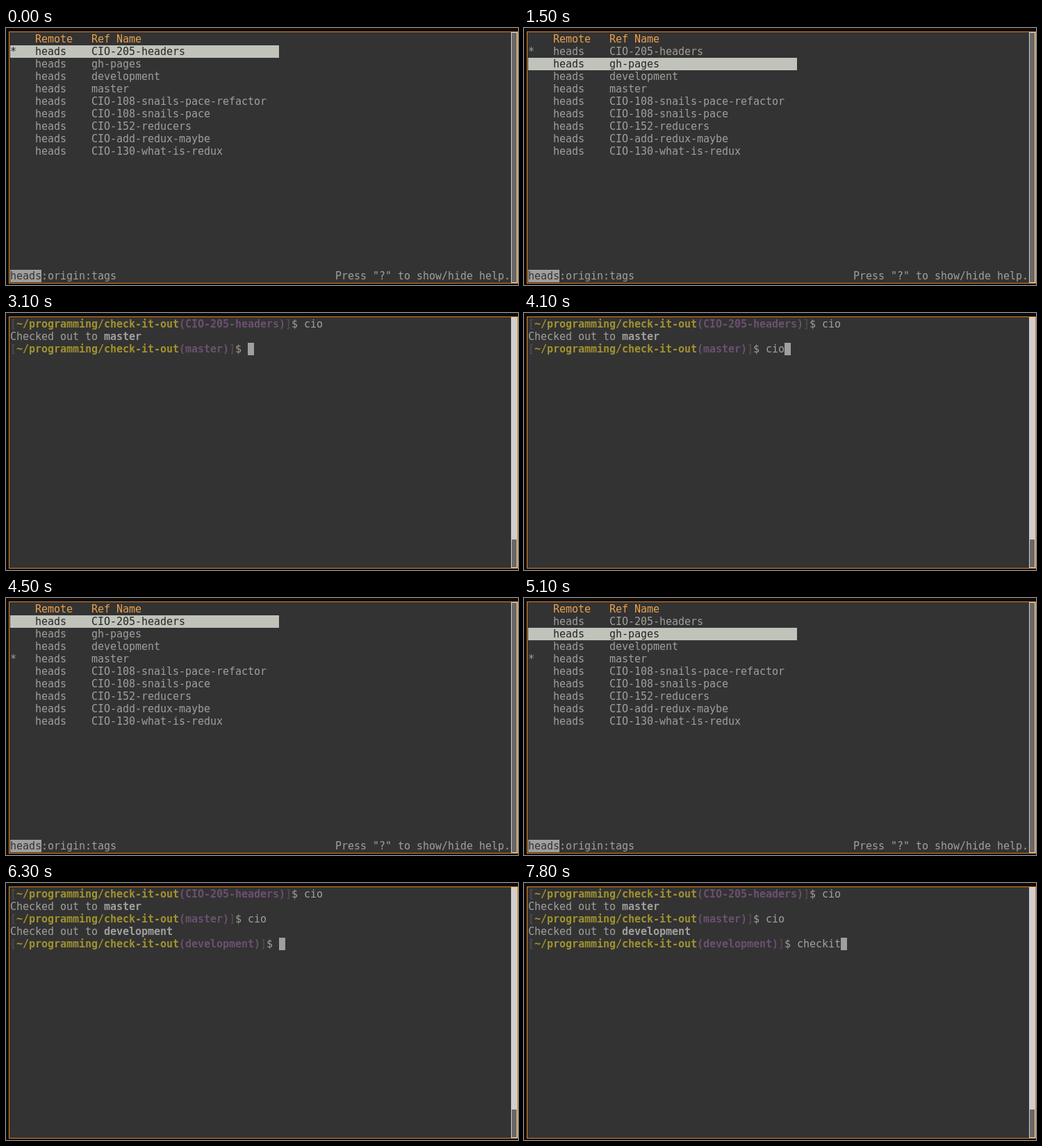
Animation, 737 px wide and 371 px high, one loop 8 s. Source, as an HTML page:

```html
<!DOCTYPE html>
<html lang="en">
<head>
<meta charset="utf-8">
<title>Branch picker in a terminal</title>
<style>
  html, body { margin: 0; width: 100%; height: 100%; overflow: hidden; background: #0c0a0b; }
  svg { display: block; }
  text { font: 15px "DejaVu Sans Mono", monospace; white-space: pre; }
  .bold { font-weight: bold; }
</style>
</head>
<body>
<svg width="737" height="371" viewBox="0 0 737 371" shape-rendering="crispEdges">
  <rect x="4.5" y="5.5" width="732" height="363" fill="#333333" stroke="#e0851f"/>
  <rect x="727" y="6" width="9" height="362" fill="#cfcfcf"/>
  <rect id="thumb" x="728" width="7" fill="#686868"/>
  <g id="screen"></g>
</svg>
<script>
const LOOP = 8000, CELL_W = 9, CELL_H = 18, LEFT = 6, TOP = 7, BASELINE = 14;
const COLOR = {
  text: '#a09f9d', head: '#e8a14f', dark: '#262626', select: '#c0c3ba',
  path: '#a0922e', branch: '#6b5070', bracket: '#58524f'
};
const BRANCHES = [
  'CIO-205-headers', 'gh-pages', 'development', 'master',
  'CIO-108-snails-pace-refactor', 'CIO-108-snails-pace', 'CIO-152-reducers',
  'CIO-add-redux-maybe', 'CIO-130-what-is-redux'
];

const screen = document.getElementById('screen');
const thumb = document.getElementById('thumb');

function add(tag, attrs) {
  const el = document.createElementNS('http://www.w3.org/2000/svg', tag);
  for (const key in attrs) el.setAttribute(key, attrs[key]);
  screen.append(el);
  return el;
}

// Every character sits on the terminal grid; returns the next free column.
function write(col, row, str, fill = COLOR.text, bold = false) {
  const x = [...str].map((_, i) => LEFT + (col + i) * CELL_W).join(' ');
  add('text', { x, y: TOP + row * CELL_H + BASELINE, fill, class: bold ? 'bold' : '' })
    .textContent = str;
  return col + str.length;
}

function block(col, row, width, fill) {
  add('rect', { x: LEFT + col * CELL_W, y: TOP + row * CELL_H,
    width: width * CELL_W, height: CELL_H, fill });
}

function setThumb(y, height) {
  thumb.setAttribute('y', y);
  thumb.setAttribute('height', height);
}

function drawList(selected, current) {
  setThumb(7, 360);
  write(4, 0, 'Remote', COLOR.head);
  write(13, 0, 'Ref Name', COLOR.head);
  BRANCHES.forEach((name, i) => {
    const row = i + 1;
    const fill = i === selected ? COLOR.dark : COLOR.text;
    if (i === selected) block(0, row, 43, COLOR.select);
    if (i === current) write(0, row, '*', fill);
    write(4, row, 'heads', fill);
    write(13, row, name, fill);
  });
  block(0, 19, 5, COLOR.text);
  write(0, 19, 'heads', '#333333');
  write(5, 19, ':origin:tags');
  write(52, 19, 'Press "?" to show/hide help.');
}

function drawPrompt(row, branch, command) {
  let col = write(0, row, '[', COLOR.bracket);
  col = write(col, row, '~/programming/check-it-out', COLOR.path, true);
  col = write(col, row, `(${branch})`, COLOR.branch, true);
  col = write(col, row, ']', COLOR.bracket);
  return write(col, row, '$ ' + command);
}

function drawShell(visited, typed, entered) {
  setThumb(327, 40);
  const last = visited.length - 1;
  visited.forEach((branch, i) => {
    const row = i * 2;
    const end = drawPrompt(row, branch, i < last ? 'cio' : typed);
    if (i < last) {
      const col = write(0, row + 1, 'Checked out to ');
      write(col, row + 1, visited[i + 1], COLOR.text, true);
    } else if (entered) {
      block(0, row + 1, 1, COLOR.text);
    } else {
      block(end, row, 1, COLOR.text);
    }
  });
}

const passed = (times, t) => times.filter(at => t >= at).length;

const FIRST_MOVES = [1500, 2100, 2700], FIRST_KEYS = [3800, 3900, 4100];
const NEXT_MOVES = [5100, 5400], NEXT_KEYS = [6900, 7100, 7200, 7300, 7500, 7700, 7800];
const STEPS = [3100, 4300, 4500, 6300, ...FIRST_MOVES, ...FIRST_KEYS, ...NEXT_MOVES, ...NEXT_KEYS];

function draw(t) {
  screen.replaceChildren();
  if (t < 3100) {
    drawList(passed(FIRST_MOVES, t), 0);
  } else if (t < 4500) {
    drawShell(['CIO-205-headers', 'master'], 'cio'.slice(0, passed(FIRST_KEYS, t)), t >= 4300);
  } else if (t < 6300) {
    drawList(passed(NEXT_MOVES, t), 3);
  } else {
    drawShell(['CIO-205-headers', 'master', 'development'],
      'checkit'.slice(0, passed(NEXT_KEYS, t)), false);
  }
}

const start = performance.now();
let shown = -1;
function tick() {
  const t = Math.max(0, performance.now() - start) % LOOP;
  const step = passed(STEPS, t);
  if (step !== shown) {
    shown = step;
    draw(t);
  }
  requestAnimationFrame(tick);
}
tick();
</script>
</body>
</html>
```
